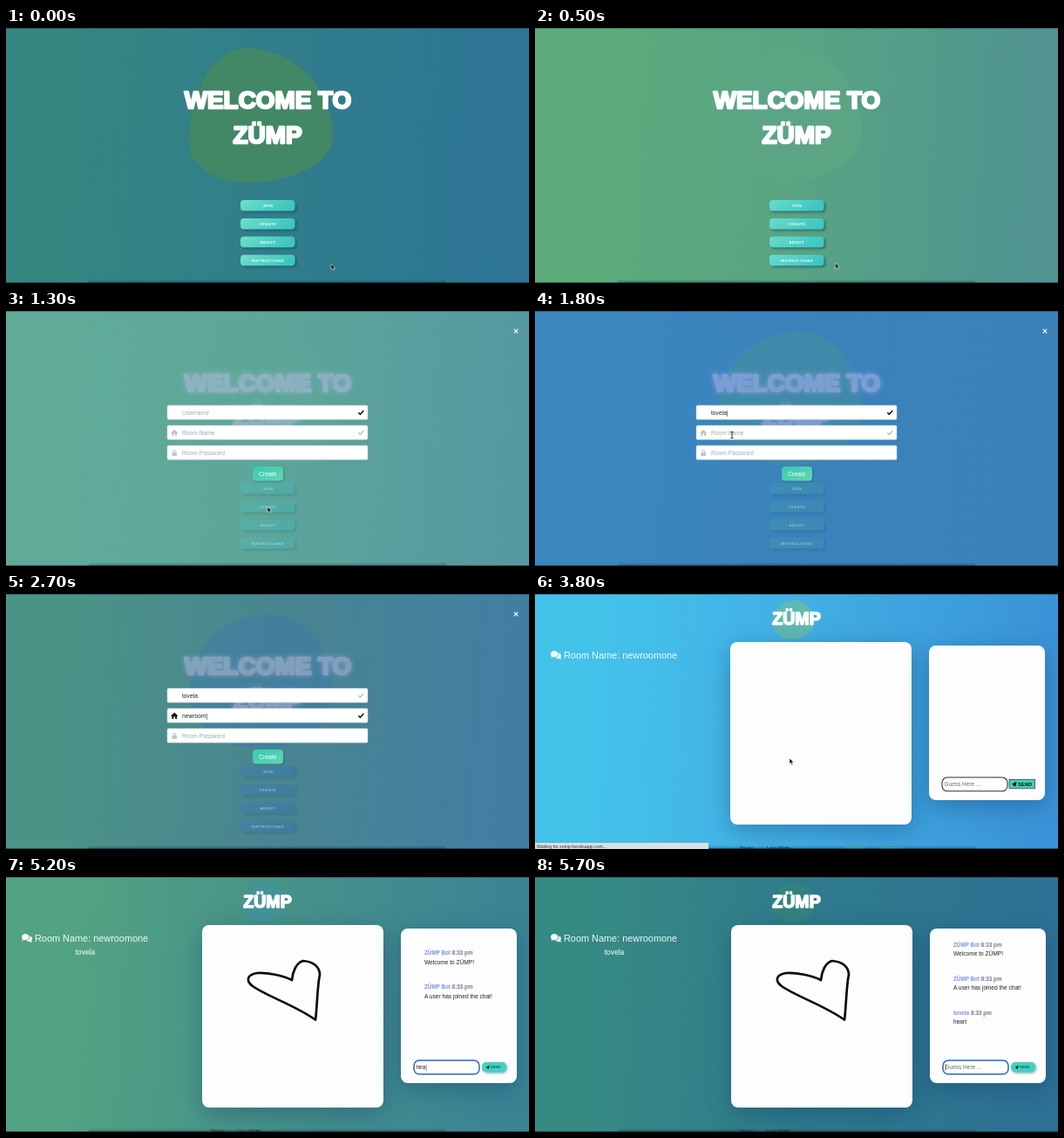
Recreate the animation shown at these times as an HTML page. Size 600 px wide and 292 px high, loop 5800 ms.

```html
<!DOCTYPE html>
<html lang="en">
<head>
<meta charset="utf-8">
<title>Drawing game</title>
<style>
  html, body { margin: 0; width: 100%; height: 100%; overflow: hidden; background: #34867f; }
  svg { display: block; width: 100%; height: 100%; font-family: "Liberation Sans", Arial, sans-serif; }
  text { white-space: pre; }
  .logo { font-weight: bold; fill: #fff; stroke: #fff; stroke-width: 2.4; stroke-linejoin: round; text-anchor: middle; }
  .btn { fill: url(#btn); filter: drop-shadow(2px 2px 1px rgba(20, 70, 90, .5)); }
  .label { font-size: 4.2px; font-weight: bold; letter-spacing: .5px; fill: #fff; text-anchor: middle; }
  .dim { opacity: .46; }
  .dim .logo { fill: #c6bff0; stroke: #c6bff0; filter: drop-shadow(0 0 3px #c6bff0); }
  .dim .btn { opacity: .8; }
  .field { fill: #fff; stroke: #c4ccd4; stroke-width: .5; }
  .entry { font-size: 6.7px; }
  .panel { fill: #fdfdfe; filter: drop-shadow(0 7px 14px rgba(15, 50, 100, .36)); }
  .name { font-size: 6.3px; font-weight: bold; fill: #7d92dc; }
  .time { fill: #76798a; }
  .body { font-size: 6.6px; fill: #222; }
  .tool { font-size: 5.6px; fill: #123; }
</style>
</head>
<body>
<svg viewBox="0 0 600 292">
  <defs>
    <linearGradient id="bg" gradientUnits="userSpaceOnUse" x1="20" y1="0" x2="590" y2="35">
      <stop offset=".1"/><stop offset=".5"/><stop offset="1"/>
    </linearGradient>
    <linearGradient id="btn" x2="1" y2=".3"><stop/><stop offset="1"/></linearGradient>
    <linearGradient id="teal" x2="1" y2="1">
      <stop stop-color="#38c8b4"/><stop offset="1" stop-color="#60d8b0"/>
    </linearGradient>
    <linearGradient id="edge" x2="0" y2="1">
      <stop stop-color="#0a2a38" stop-opacity="0"/><stop offset="1" stop-color="#0a2a38" stop-opacity=".4"/>
    </linearGradient>
  </defs>
  <rect width="600" height="292" fill="url(#bg)"/>
  <rect width="600" height="1" fill="#0a2a38" opacity=".35"/>

  <g id="home">
    <path id="blob"/>
    <text class="logo" x="300.5" y="92.3" font-size="27.9">WELCOME TO</text>
    <text class="logo" x="300" y="132.3" font-size="27.9">ZÜMP</text>
    <g id="menu"></g>
  </g>

  <g id="modal">
    <path d="M582.7 20.7l4.6 4.6m0-4.6l-4.6 4.6" stroke="#fff" stroke-width="1.1"/>
    <g id="form"></g>
    <rect x="283" y="178" width="35" height="16.5" rx="4" fill="url(#teal)" style="filter:drop-shadow(1px 1.5px 1px rgba(20,80,100,.4))"/>
    <text x="300.3" y="188.6" font-size="6.8" fill="#fff" text-anchor="middle">Create</text>
  </g>

  <g id="room">
    <path id="miniBlob" transform="translate(211 .2) scale(.292)"/>
    <text class="logo" x="300" y="34.5" font-size="19.6" style="stroke-width:1.6">ZÜMP</text>
    <g fill="#fff">
      <path d="M18 68.6a4.3 3.5 0 1 1 3.2 3.4l-3 .9 1-1.7a3 3 0 0 1-1.2-2.6"/>
      <path d="M27.4 67.6a3.4 3.2 0 0 1 1.7 5.2l1.2 1.9-3-.8a5 4 0 0 1-4.3-1.1 5 4.5 0 0 0 4.4-5.2"/>
      <text x="33" y="73.8" font-size="10.9" opacity=".92">Room Name: newroomone</text>
      <text id="player" x="91" y="88.5" font-size="8.5" text-anchor="middle">tovela</text>
    </g>
    <text class="tool" x="235" y="293.3">Stroke</text>
    <text class="tool" x="266" y="293.3">Line Width</text>
    <g id="panels">
      <rect class="panel" x="225" y="55" width="208" height="209" rx="8"/>
      <rect class="panel" x="453" y="59" width="133" height="177" rx="8"/>
      <rect id="guessBox" x="468" y="210" width="75" height="15.8" rx="6" fill="#fff"/>
      <text id="guess" x="470.5" y="220.4" font-size="6.5"></text>
      <path id="guessCaret" d="M471 214v8" stroke="#222" stroke-width=".6"/>
    </g>
    <g id="chat"></g>
    <path id="heart" fill="none" stroke="#0a0a0a" stroke-width="2.7" stroke-linecap="round" stroke-linejoin="round"
      d="M328 118C318 113 300 109 288 110C276 112 275 119 283 125C300 137 330 146 355 163.5C357 150 357 125 360 112C360 103 353 97 341 96C333 98 329 108 328 118"/>
    <g id="send">
      <rect x="546" y="212" width="28" height="11.5" rx="5" fill="#45cfc0" style="filter:drop-shadow(1px 1.5px 1.5px rgba(30,120,130,.6))"/>
      <path d="M550.5 218l4.2-2.4-.8 4.2-1.2-.6-.8.9v-1.5z" fill="#123"/>
      <text x="556" y="219.3" font-size="4.2" fill="#123">SEND</text>
    </g>
    <g id="loading">
      <rect x="544" y="212.3" width="29.5" height="10.5" fill="#45cfb4" stroke="#333" stroke-width=".7"/>
      <path d="M547 217.8l5.5-3-1 5.4-1.7-.8-1 1.1v-1.9z" fill="#111"/>
      <text x="554" y="219.6" font-size="5.8" font-weight="bold" fill="#111">SEND</text>
      <path d="M355 290h25v2h-25zM397 290h24v2h-24z" fill="#45cfb4"/>
    </g>
  </g>

  <rect x="95" y="288" width="410" height="4" fill="url(#edge)"/>
  <rect y="291" width="600" height="1" fill="#0a2a38" opacity=".6"/>
  <g id="status">
    <rect y="285" width="199" height="7" fill="#dcdfe1"/>
    <text x="2" y="290.6" font-size="5.2" fill="#333">Waiting for zump.herokuapp.com...</text>
  </g>
  <g id="cursor">
    <path d="M0 0v6.5l1.5-1.3 1.1 2.5 1.2-.5-1.1-2.4h2z" fill="#111" stroke="#fff" stroke-width=".5"/>
    <path d="M-.5-3q1-1 1.4.3v2l2.6.6q1 .4.8 1.6l-.7 2.7h-3.8l-2-3q0-1 1.5.1z" fill="#fff" stroke="#222" stroke-width=".6"/>
    <path d="M-1.5-3.5h3m-1.5 0v7m-1.5 0h3" fill="none" stroke="#111" stroke-width=".8"/>
  </g>
</svg>
<script>
const $ = id => document.getElementById(id);
const LOOP = 5800, STEP = 100, OPEN = 1300, ENTER = 3700, READY = 4000, SENT = 5400;

// time, background left / middle / right, blob, button left / right
const colors = [
  [0, "348680", "317e8b", "2d7495", "428866", "70dfcd", "3dc6bd"],
  [900, "7dc878", "78c27d", "6cab8e", "6fbc9d", "62d9d0", "42c6c6"],
  [1800, "3a87c0", "3b82bb", "3a80b9", "479297", "45a3ac", "3d98aa"],
  [2700, "4b9387", "498590", "417ea2", "3d79ad", "3a80c0", "2f74b8"],
  [3600, "45a0b4", "4498b8", "3d88b8", "459aa8", "45a0b4", "3d90b0"],
  [3800, "43c2ea", "42afe5", "3a93d6", "60b8b2", "45cfc0", "45cfc0"],
  [4500, "7ac77f", "69b486", "4d9c94", "55aebb", "45cfc0", "45cfc0"],
  [5700, "368a84", "2f7b8b", "2d7194", "34827f", "45cfc0", "45cfc0"],
  [5800, "348680", "317e8b", "2d7495", "428866", "70dfcd", "3dc6bd"]
];

// time, x, y, shape (0 arrow, 1 hand, 2 text bar)
const moves = [
  [0, 373, 270, 0], [300, 364, 270, 0], [700, 325, 268, 1], [900, 319, 267, 1],
  [1200, 303, 226, 1], [1300, 300, 224, 0], [1500, 262, 165, 0], [1700, 226, 142, 2],
  [2000, 226, 142, 2], [3000, 230, 150, 2], [3100, 228, 164, 2], [3400, 290, 187, 1],
  [3600, 297, 189, 1], [3700, 292, 188, 0], [3900, 292, 188, 0], [4050, 328, 118, 0],
  [4600, 328, 118, 0], [4800, 500, 218, 2], [5800, 500, 218, 2]
];

const fields = [
  { y: 108, hint: "Username", value: "tovela", from: 1400, pace: 65, focus: [1300, 1900], icon: "" },
  { y: 131, hint: "Room Name", value: "newroomone", from: 2000, pace: 100, focus: [1900, 3100],
    icon: "M189 139.5l4.2-3.7 4.2 3.7-.6.6-.7-.6v3.5h-2v-2.4h-1.8v2.4h-2v-3.5l-.7.6z" },
  { y: 154, hint: "Room Password", value: "••••••", from: 3150, pace: 60, focus: [3100, 3700],
    icon: "M190.5 162h.8v-1.2a1.9 1.9 0 0 1 3.8 0v1.2h.8v4h-5.4zm1.8 0h1.8v-1.1a.9.9 0 0 0-1.8 0z" }
];

const messages = [
  [READY, "ZÜMP Bot", "Welcome to ZÜMP!"],
  [READY, "ZÜMP Bot", "A user has joined the chat!"],
  [SENT, "tovela", "heart"]
];

$("menu").innerHTML = ["JOIN", "CREATE", "ABOUT", "INSTRUCTIONS"].map((label, i) => {
  const y = 197 + i * 20.9;
  return `<rect class="btn" x="269" y="${y}" width="62.5" height="12.5" rx="4"/>
    <text class="label" x="300.3" y="${y + 7.8}">${label}</text>`;
}).join("");

$("form").innerHTML = fields.map(({ y, icon }, i) => `
  <rect class="field" x="185" y="${y}" width="230" height="16.3" rx="1.5"/>
  <path id="icon${i}" d="${icon}"/>
  <text id="entry${i}" class="entry" x="202" y="${y + 10.6}"></text>
  ${i < 2 ? `<path id="check${i}" d="M404.3 ${y + 8.3}l2 2 4-4.3" fill="none" stroke-width="1.6"/>` : ""}`).join("");

$("chat").innerHTML = messages.map(([, name, body], i) => {
  const y = 89 + i * 39;
  return `<g><text class="name" x="480" y="${y}">${name}<tspan class="time"> 8:33 pm</tspan></text>
    <text class="body" x="480" y="${y + 10.5}">${body}</text></g>`;
}).join("");

const lerp = (a, b, k) => a + (b - a) * k;
const clamp = k => Math.max(0, Math.min(1, k));
const show = (el, on) => el.style.display = on ? "" : "none";
const typed = (word, from, pace, t) => word.slice(0, Math.max(0, Math.floor((t - from) / pace)));

function between(keys, t) {
  const i = Math.max(1, keys.findIndex(key => key[0] > t));
  const [a, b] = [keys[i - 1], keys[i]];
  return [a, b, (t - a[0]) / (b[0] - a[0])];
}

function mix(a, b, k) {
  const part = (c, i) => parseInt(c.slice(i, i + 2), 16);
  return `rgb(${[0, 2, 4].map(i => Math.round(lerp(part(a, i), part(b, i), k)))})`;
}

// Four quarter ellipses; round = 1 gives a nearly even oval.
function blobPath(round) {
  const top = lerp(276, 302, round), right = lerp(125, 113, round);
  const bottom = lerp(274, 292, round), left = lerp(130, 113, round);
  const arc = (rx, ry, x, y) => `A${rx} ${ry} 0 0 1 ${x} ${y}`;
  return `M${top} 23` + arc(375 - top, right - 23, 375, right) + arc(375 - bottom, 177 - right, bottom, 177)
    + arc(bottom - 210, 177 - left, 210, left) + arc(top - 210, left - 23, top, 23);
}

const bgStops = document.querySelectorAll("#bg stop");
const btnStops = document.querySelectorAll("#btn stop");
const heart = $("heart"), heartLength = heart.getTotalLength();

function paint(t) {
  const [a, b, k] = between(colors, t);
  const tone = i => mix(a[i], b[i], k);
  bgStops.forEach((stop, i) => stop.setAttribute("stop-color", tone(i + 1)));
  btnStops.forEach((stop, i) => stop.setAttribute("stop-color", tone(i + 5)));
  const shape = blobPath(clamp(t / 900));
  for (const id of ["blob", "miniBlob"]) {
    $(id).setAttribute("d", shape);
    $(id).setAttribute("fill", tone(4));
  }

  const inModal = t >= OPEN && t < ENTER, inRoom = t >= ENTER;
  show($("home"), !inRoom);
  $("home").setAttribute("class", inModal ? "dim" : "");
  show($("modal"), inModal);
  show($("room"), inRoom);
  if (inModal) paintForm(t);
  if (inRoom) paintRoom(t);
  show($("status"), inRoom && t < READY);
  paintCursor(t);
}

function paintForm(t) {
  fields.forEach((f, i) => {
    const active = t >= f.focus[0] && t < f.focus[1];
    const value = typed(f.value, f.from, f.pace, t), entry = $("entry" + i);
    entry.textContent = value ? value + (active ? "|" : "") : f.hint;
    entry.setAttribute("fill", value ? "#222" : "#a2a8ae");
    const ink = active ? "#181818" : "#c2c4c6";
    $("icon" + i).setAttribute("fill", ink);
    if (i < 2) $("check" + i).setAttribute("stroke", ink);
  });
}

function paintRoom(t) {
  const ready = t >= READY;
  show($("player"), ready);
  show($("send"), ready);
  show($("loading"), !ready);
  $("panels").setAttribute("transform", `translate(${ready ? 0 : -1} 0)`);
  messages.forEach(([from], i) => show($("chat").children[i], t >= from));
  // The log scrolls down when the guess arrives.
  $("chat").setAttribute("transform", `translate(0 ${t >= SENT ? -9.5 : 0})`);

  const drawn = clamp((t - 4050) / 500);
  show(heart, drawn > 0);
  heart.setAttribute("stroke-dasharray", `${drawn * heartLength} 999`);

  const focused = t >= 4800, word = t < SENT ? typed("heart", 4850, 90, t) : "";
  $("guess").textContent = word ? word + "|" : "Guess Here ...";
  $("guess").setAttribute("fill", word ? "#222" : "#686c70");
  $("guessBox").setAttribute("stroke", focused ? "#2868ba" : "#2c3034");
  $("guessBox").setAttribute("stroke-width", focused ? 1.5 : 1.1);
  show($("guessCaret"), focused && !word);
}

function paintCursor(t) {
  const [a, b, k] = between(moves, t);
  let x = lerp(a[1], b[1], k), y = lerp(a[2], b[2], k);
  if (t >= 4050 && t < 4600) {
    const tip = heart.getPointAtLength((t - 4050) / 500 * heartLength + 5);
    [x, y] = [tip.x, tip.y];
  }
  const typing = (t >= 2000 && t < 3000) || t >= 4900;
  show($("cursor"), !typing);
  $("cursor").setAttribute("transform", `translate(${x} ${y})`);
  [...$("cursor").children].forEach((el, i) => show(el, i === a[3]));
}

const start = performance.now();
function tick() {
  const t = (performance.now() - start) % LOOP;
  paint(Math.floor(t / STEP) * STEP);
  requestAnimationFrame(tick);
}
tick();
</script>
</body>
</html>
```
